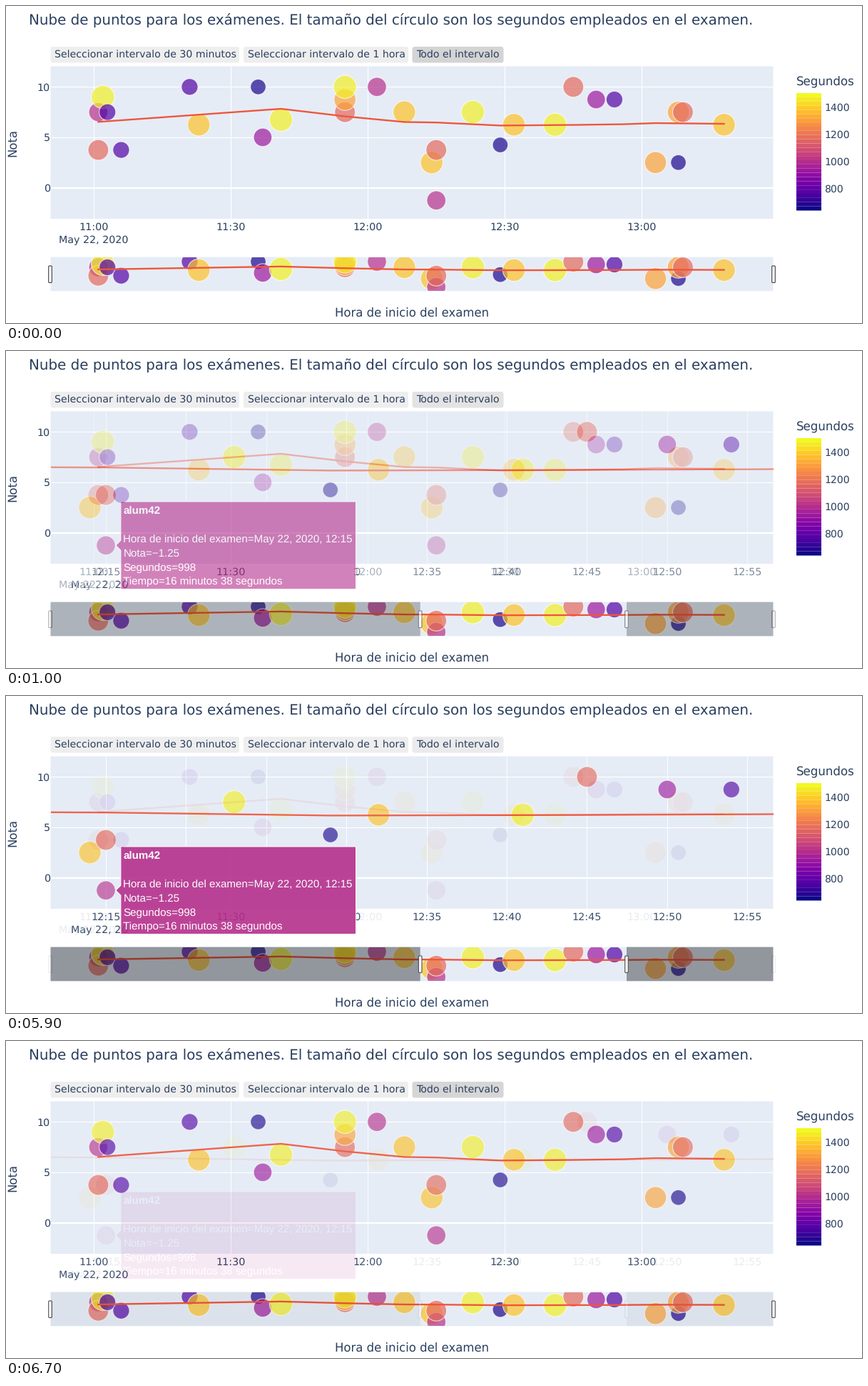
Recreate the animation shown at these times as a matplotlib script. Size 1200x444 px, loop 6800 ms.

```python
import matplotlib.pyplot as plt
import numpy as np
from matplotlib.animation import FuncAnimation
from matplotlib.patches import FancyBboxPatch, Polygon, Rectangle

plt.rcParams["font.family"] = "DejaVu Sans"
plt.rcParams["text.hinting"] = "none"

W, H, DPI = 1200, 444, 100
PT = 72 / DPI            # points per pixel
STROKE = 1.165 * PT
INK, PANEL, TREND = "#2a3f5f", "#e5ecf6", "#ef553b"
LEFT, RIGHT = 62.5, 1075.5
TOP, BOTTOM = 84.5, 298
S_TOP, S_BOTTOM = 351.6, 399.3
S_MIN, S_MAX = 640, 1500
ZERO, UNIT = 254.6, 14.13     # y of mark 0, pixels per mark
SQUASH = (S_BOTTOM - S_TOP) / (BOTTOM - TOP)

# seconds spent: {minutes after 11:00: mark}
EXAMS = {
    660: {36: 10, 89: 4.25, 128: 2.5},
    760: {3: 7.5, 6: 3.75, 21: 10, 114: 8.75},
    930: {37: 5, 110: 8.75},
    1000: {1: 7.5, 62: 10, 75: -1.25},
    1170: {1: 3.75, 55: 7.5, 75: 3.75, 105: 10, 129: 7.5},
    1320: {55: 8.75, 123: 2.5, 128: 7.5},
    1390: {23: 6.25, 68: 7.5, 74: 2.5, 92: 6.25, 138: 6.25},
    1480: {2: 9, 41: 6.75, 55: 10, 83: 7.5, 101: 6.25},
}
# bends of the trend line
BENDS = [(1, 6.53), (41, 7.83), (55, 7.08), (68, 6.52), (75, 6.47),
         (89, 6.17), (105, 6.23), (116, 6.3), (123, 6.41), (138, 6.34)]


def heat(seconds):
    return plt.cm.plasma((np.asarray(seconds) - S_MIN) / (S_MAX - S_MIN))


def x_full(m):
    return 123 + 6.403 * m


def x_zoom(m):
    return 140 + 22.483 * (m - 75)


def y_main(mark):
    return ZERO - UNIT * mark


def y_slider(mark):
    return S_TOP + SQUASH * (y_main(mark) - TOP)


def label(ax, x, y, s, size=14.2, ha="left", color=INK, z=4, **kw):
    ax.text(x, y, s, fontsize=size * PT, ha=ha, color=color, zorder=z,
            **{"va": "baseline", **kw})


def box(ax, x0, y0, x1, y1, color, z, **kw):
    rect = Rectangle((x0, y0), x1 - x0, y1 - y0, fc=color, lw=0, zorder=z,
                     snap=False, **kw)
    return ax.add_patch(rect)


def rounded(ax, x0, y0, x1, y1, r, z, **kw):
    style = f"round,pad=0,rounding_size={r}"
    ax.add_patch(FancyBboxPatch((x0, y0), x1 - x0, y1 - y0,
                                boxstyle=style, zorder=z, **kw))


def traces(ax, fx, fy, clip):
    # later exams, then longer ones, lie on top
    exams = sorted((m, s, mark) for s, group in EXAMS.items()
                   for m, mark in group.items())
    m, secs, mark = np.array(exams).T
    diameter = 2 * 0.421 * np.sqrt(secs) * PT
    dots = ax.scatter(fx(m), fy(mark), s=diameter ** 2, c=heat(secs),
                      alpha=0.7, edgecolors="white", linewidths=STROKE, zorder=2)
    bm, bmark = np.array(BENDS).T
    line, = ax.plot(fx(bm), fy(bmark), color=TREND, lw=2 * STROKE, zorder=3)
    for artist in (dots, line):
        artist.set_clip_path(clip)
        artist.set_snap(False)


def frame_text(ax):
    label(ax, 32, 26.2, "Nube de puntos para los exámenes. El tamaño del círculo "
          "son los segundos empleados en el examen.", 19.9)
    label(ax, 569, 435.3, "Hora de inicio del examen", 16.5, "center")
    label(ax, 9, 191, "Nota", 16.5, "center", va="center", rotation=90)


def buttons(ax, all_active):
    items = [(62.5, 327, "Seleccionar intervalo de 30 minutos"),
             (333, 564, "Seleccionar intervalo de 1 hora"),
             (569.5, 697.5, "Todo el intervalo")]
    for x0, x1, s in items:
        active = all_active and s.startswith("Todo")
        rounded(ax, x0, 57, x1, 79.5, 3.5, 1, lw=0,
                fc="#d4d4d4" if active else "#eeeeee")
        label(ax, x0 + 6, 72.2, s, 14.1)


def colorbar(ax):
    label(ax, 1108.3, 111.5, "Segundos", 16.6)
    edges = np.linspace(286.5, 122, 29)
    steps = np.linspace(S_MIN, S_MAX, 28)
    for lo, hi, s in zip(edges[:-1], edges[1:], steps):
        box(ax, 1108, hi, 1143, lo, heat(s), 1)
    for s in range(800, 1401, 200):
        label(ax, 1147, 261.2 - (s - 800) * 0.1915, str(s), 14)


def axes_grid(ax, fx, minutes):
    for m in minutes:
        x = fx(m)
        ax.plot([x, x], [TOP, BOTTOM], color="white", lw=STROKE, zorder=1.5,
                solid_capstyle="butt")
        label(ax, x, 313.7, f"{11 + m // 60}:{m % 60:02d}", 14.4, "center")
    label(ax, fx(minutes[0]), 332, "May 22, 2020", 14.2, "center")
    for mark in (0, 5, 10):
        y = y_main(mark)
        ax.plot([LEFT, RIGHT], [y, y], color="white", zorder=1.5,
                lw=STROKE * (1 if mark else 2), solid_capstyle="butt")
        label(ax, 62, y + 5.2, str(mark), 14.2, "right")


def handle(ax, x):
    rounded(ax, x - 2.3, 364, x + 2.3, 387.5, 1.2, 5,
            fc="white", ec="#444444", lw=STROKE)


def tooltip(ax):
    x0, x1, y0, y1 = 160.8, 490.6, 210.9, 333.6
    mid = y_main(-1.25)
    shape = [(153.8, mid), (x0, mid - 7), (x0, y0), (x1, y0),
             (x1, y1), (x0, y1), (x0, mid + 7)]
    ax.add_patch(Polygon(shape, fc=heat(998), ec="white", lw=STROKE, zorder=6))
    lines = ["alum42", "", "Hora de inicio del examen=May 22, 2020, 12:15",
             "Nota=\u22121.25", "Segundos=998", "Tiempo=16 minutos 38 segundos"]
    for i, s in enumerate(lines):
        label(ax, 164.4, 228.6 + 19.7 * i, s, 15.15, color="white", z=7,
              family="Liberation Sans", weight="normal" if i else "bold")


def scene(fig, zoomed):
    ax = fig.add_axes([0, 0, 1, 1], label="zoom" if zoomed else "full")
    ax.set(xlim=(0, W), ylim=(H, 0))
    ax.axis("off")
    box(ax, 0, 0, W, H, "white", 0)
    main = box(ax, LEFT, TOP, RIGHT, BOTTOM, PANEL, 1)
    slider = box(ax, LEFT, S_TOP, RIGHT, S_BOTTOM, PANEL, 1)
    fx = x_zoom if zoomed else x_full
    axes_grid(ax, fx, range(75, 116, 5) if zoomed else range(0, 121, 30))
    traces(ax, fx, y_main, main)
    traces(ax, x_full, y_slider, slider)
    frame_text(ax)
    buttons(ax, not zoomed)
    colorbar(ax)
    if zoomed:
        start, end = 580.7, 870
        box(ax, LEFT, S_TOP, start, S_BOTTOM, "black", 4, alpha=0.4)
        box(ax, end, S_TOP, RIGHT, S_BOTTOM, "black", 4, alpha=0.4)
        tooltip(ax)
    else:
        start, end = 62, 1076
    handle(ax, start)
    handle(ax, end)


def fade(p):
    """Group opacity for a whole layer."""
    def apply(img, dpi):
        out = np.rint(img * 255)
        out[..., 3] = np.rint(out[..., 3] * p)
        return out.astype(np.uint8), 0, 0
    return apply


fig = plt.figure(figsize=(W / DPI, H / DPI), dpi=DPI, facecolor="white")
for zoomed in (False, True):
    scene(fig, zoomed)
zoom = fig.axes[-1]

STEP, COUNT = 100, 68


def update(i):
    t = i * STEP
    p = min(max(min(t - 400, STEP * COUNT - t) / 1000, 0), 1)
    zoom.set_visible(p > 0)
    zoom.set_agg_filter(fade(p) if p < 1 else None)
    return [zoom]


anim = FuncAnimation(fig, update, frames=COUNT, init_func=lambda: update(0),
                     interval=STEP, repeat=True, repeat_delay=0, blit=False)
plt.show()
```
